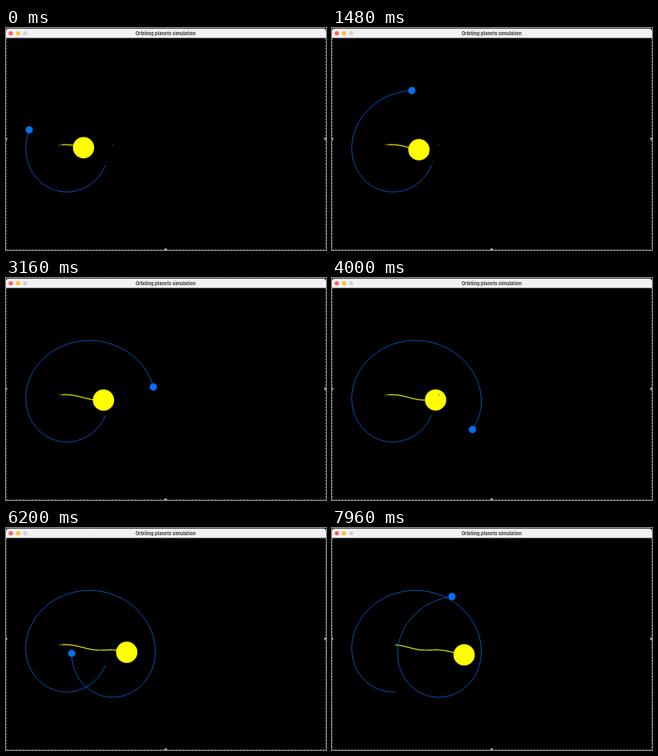
Write an HTML page with a canvas that moves like this. It is 400 px wide and 278 px high and loops after 8 s.

```html
<!DOCTYPE html>
<html lang="en">
<head>
<meta charset="utf-8">
<title>Orbiting planets simulation</title>
<style>
  html, body { margin: 0; width: 100%; height: 100%; overflow: hidden; background: #000; }
  canvas { display: block; width: 400px; height: 278px; }
</style>
</head>
<body>
<canvas id="stage" width="400" height="278"></canvas>
<script>
const ctx = document.getElementById('stage').getContext('2d');
const W = 400, H = 278, LOOP = 8000, STEP = 40;
const RAD = Math.PI / 180;

// Orbit of the planet relative to the sun; times in seconds
const orbit = { a: 66.65, e: 0.125, tilt: 67 * RAD, phase: 119.7 * RAD, rate: 54.6 * RAD };
const MASS_RATIO = 0.02;
const SECOND = -2.86, STEADY = -2.79; // the first trail points are sparse
const FULL_AT = 6.96;                 // from here on the trail loses its tail
const sunStart = { x: 67.2, y: 146.4 }, planetStart = { x: 133.7, y: 146.4 };

function relative(t) {
  const { a, e, tilt, phase, rate } = orbit;
  const mean = phase + rate * t;
  let ecc = mean;
  for (let i = 0; i < 6; i++) {
    ecc -= (ecc - e * Math.sin(ecc) - mean) / (1 - e * Math.cos(ecc));
  }
  const x = a * (Math.cos(ecc) - e);
  const y = a * Math.sqrt(1 - e * e) * Math.sin(ecc);
  return {
    x: x * Math.cos(tilt) - y * Math.sin(tilt),
    y: x * Math.sin(tilt) + y * Math.cos(tilt)
  };
}

function sunAt(t) {
  const r = relative(t);
  return {
    x: 95.6 + 8.7 * t - MASS_RATIO * r.x,
    y: 149.4 + 1.01 * t - MASS_RATIO * r.y
  };
}

function planetAt(t) {
  const s = sunAt(t), r = relative(t);
  return { x: s.x + r.x, y: s.y + r.y };
}

function disc(x, y, r, color) {
  ctx.fillStyle = color;
  ctx.beginPath();
  ctx.arc(x, y, r, 0, Math.PI * 2);
  ctx.fill();
}

function trail(at, first, t, color, width) {
  const dropped = Math.max(0, Math.round((t - FULL_AT) * 1000 / STEP));
  [first, at(SECOND)].slice(dropped).forEach(p => disc(p.x, p.y, 0.65, color));
  const start = STEADY + Math.max(0, dropped - 2) * STEP / 1000;
  ctx.strokeStyle = color;
  ctx.lineWidth = width;
  ctx.lineJoin = 'round';
  ctx.beginPath();
  for (let time = start; time < t; time += STEP / 1000) {
    const p = at(time);
    ctx.lineTo(p.x, p.y);
  }
  const head = at(t);
  ctx.lineTo(head.x, head.y);
  ctx.stroke();
}

function dashedEdge(x1, y1, x2, y2) {
  ctx.beginPath();
  ctx.moveTo(x1, y1);
  ctx.lineTo(x2, y2);
  ctx.stroke();
}

function drawTitle() {
  // Scaled down from the usual size, so that the glyphs keep their proportions
  ctx.save();
  ctx.translate(199.5, 8.5);
  ctx.scale(0.25, 0.25);
  ctx.fillStyle = '#3a393a';
  ctx.font = '700 22.8px Inter, sans-serif';
  ctx.textAlign = 'center';
  ctx.fillText('Orbiting planets simulation', 0, 0);
  ctx.restore();
}

function drawWindow() {
  ctx.fillStyle = '#f3f1f3';
  ctx.beginPath();
  ctx.roundRect(0, 0.8, W, 11.8, [3.5, 3.5, 0, 0]);
  ctx.fill();
  disc(6, 6.6, 2.7, '#fe5f57');
  disc(15, 6.6, 2.7, '#febc2e');
  disc(24, 6.6, 2.7, '#d4d2d4');
  drawTitle();

  // Selection border with its handles
  ctx.strokeStyle = '#5a5a5a';
  ctx.lineWidth = 1;
  ctx.setLineDash([2, 2]);
  dashedEdge(0, 0.5, W, 0.5);
  dashedEdge(0, H - 0.5, W, H - 0.5);
  dashedEdge(0.5, 13, 0.5, H);
  dashedEdge(W - 0.5, 13, W - 0.5, H);
  ctx.setLineDash([]);
  disc(0, 138.8, 1.7, '#a8a8a8');
  disc(W - 0.8, 138.8, 1.7, '#a8a8a8');
  disc(199.7, H - 0.6, 1.7, '#a8a8a8');
}

function draw(now) {
  const t = Math.floor((now % LOOP) / STEP) * STEP / 1000;
  ctx.fillStyle = '#000';
  ctx.fillRect(0, 0, W, H);
  const sun = sunAt(t), planet = planetAt(t);
  trail(sunAt, sunStart, t, '#e6e600', 1.2);
  disc(sun.x, sun.y, 13.3, '#ffff00');
  trail(planetAt, planetStart, t, '#0054ba', 1);
  disc(planet.x, planet.y, 4.5, '#0072f6');
  drawWindow();
}

const began = performance.now();
function tick() {
  draw(performance.now() - began);
  requestAnimationFrame(tick);
}
tick();
</script>
</body>
</html>
```
